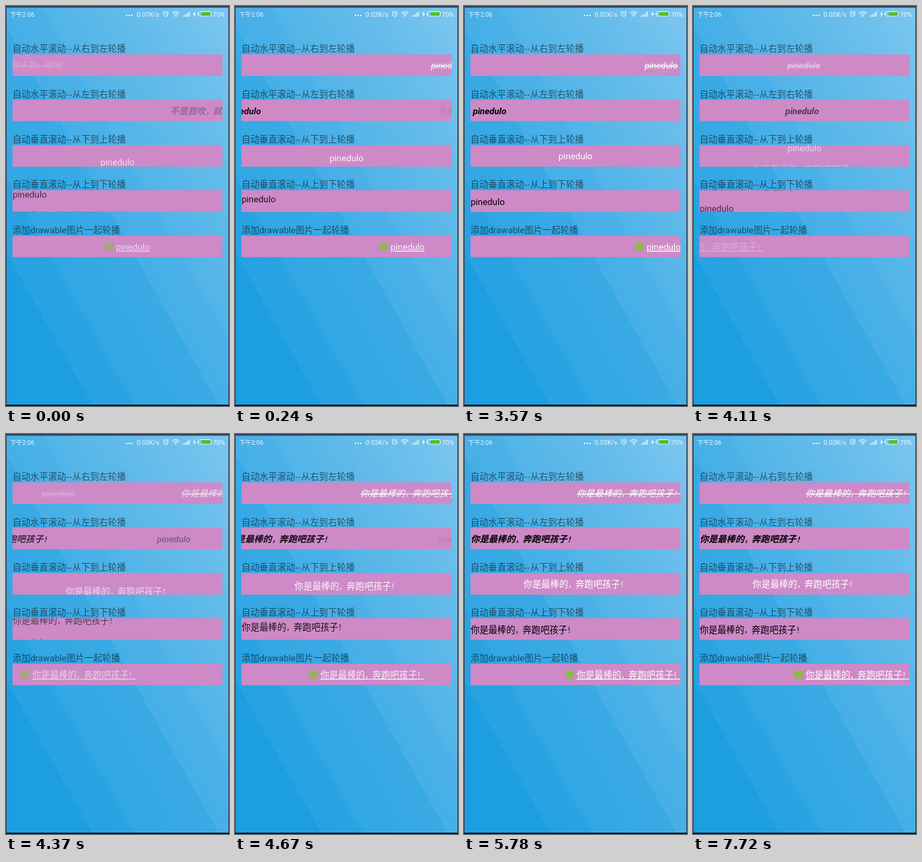
An HTML page for the animation above (8000 ms loop, 333 px wide and 595 px high).

```html
<!DOCTYPE html>
<html lang="zh">
<head>
<meta charset="utf-8">
<style>
html, body { margin: 0; width: 100%; height: 100%; overflow: hidden; background: #0d141c; }
svg { display: block; }
svg svg { overflow: hidden; }
text { font: 13.33px Roboto, "Noto Sans CJK SC", "Noto Sans CJK", sans-serif; white-space: pre; }
.status text { font-size: 9.7px; fill: #fff; }
.status .clock { font-size: 9.3px; }
.label { fill: #000; fill-opacity: .54; }
.dashed { font-family: "Noto Sans CJK SC", "Noto Sans CJK", sans-serif; }
.mark { font-family: "Noto Sans CJK JP", "Noto Sans CJK", sans-serif; font-size: 11px; }
.light { fill: #fff; }
.strike { font-style: italic; text-decoration: line-through; }
.bold { font-style: italic; font-weight: bold; }
.under { text-decoration: underline; }
</style>
</head>
<body>
<svg id="stage" width="333" height="595" viewBox="0 0 333 595">
  <defs>
    <linearGradient id="sky" gradientUnits="userSpaceOnUse" x1="-252" y1="142" x2="252" y2="-142">
      <stop offset=".19" stop-color="#1c9ee0"/>
      <stop offset=".19" stop-color="#27a2e2"/>
      <stop offset=".285" stop-color="#29a3e2"/>
      <stop offset=".285" stop-color="#32a7e3"/>
      <stop offset=".475" stop-color="#3aaae5"/>
      <stop offset=".475" stop-color="#46afe7"/>
      <stop offset=".58" stop-color="#4bb1e8"/>
      <stop offset=".58" stop-color="#51b4e8"/>
      <stop offset=".76" stop-color="#62bbea"/>
      <stop offset="1" stop-color="#7cc6f0"/>
    </linearGradient>
  </defs>
  <rect width="333" height="593" fill="#33435a"/>
  <rect x="1" y="2.5" width="331" height="590.5" fill="url(#sky)"/>
  <g class="status" fill="none" stroke="#fff" opacity=".9">
    <g stroke="none">
      <text class="clock" x="6" y="15.5">下午2:06</text>
      <text id="speed" x="195" y="15.5"></text>
      <text x="309" y="15.5">70%</text>
    </g>
    <path d="M179 14h2m2 0h2m2 0h2" stroke-width="2"/>
    <circle cx="238.5" cy="12" r="3.5"/>
    <path d="M238.5 10v2.3h2M234.3 9l2-1.6M242.7 9l-2-1.6"/>
    <path d="M248 10.5q5.5-4.5 11 0M250 12.5q3.5-2.8 7 0" stroke-width="1.2"/>
    <circle cx="253.5" cy="14.5" r="1.2" fill="#fff" stroke="none"/>
    <path d="M265 16v-2m2.2 2v-3m2.2 3v-4.5m2.2 4.5v-6m2.2 6v-8" stroke-width="1.2"/>
    <path d="M282.5 7.5l-3.5 5h2.300l-1 4 3.700-5h-2.400z" fill="#fff" stroke="none"/>
    <rect x="287.5" y="8.5" width="19" height="6.500" rx="2"/>
    <path d="M286.5 10.5v2.5"/>
    <rect x="292" y="9" width="13.5" height="5.500" rx="1" fill="#4fc110" stroke="none"/>
  </g>
</svg>
<script>
const LOOP = 8000, SLIDE = 1436, WIDTH = 314, HEIGHT = 32.4;
const messages = ['不是我吹，就没做不到，哈哈', 'pinedulo', '你是最棒的，奔跑吧孩子！'];
const slideStarts = [-971, 3461];
// The screen only refreshes at these moments.
const refreshes = [0, 120, 240, 390, 520, 670, 3570, 3690, 3840, 3960, 4110,
  4250, 4370, 4520, 4670, 4820, 4950, 5100];
const speeds = [[0, '0.07K/s'], [120, '0.02K/s'], [4250, '0.03K/s']];

const rows = [
  { label: '自动水平滚动--从右到左轮播', style: 'light strike', anchor: 'end', dx: -1, dy: 0, delay: 0 },
  { label: '自动水平滚动--从左到右轮播', style: 'bold', anchor: 'start', dx: 1, dy: 0, delay: 16 },
  { label: '自动垂直滚动--从下到上轮播', style: 'light', anchor: 'middle', dx: 0, dy: -1, delay: 45 },
  { label: '自动垂直滚动--从上到下轮播', style: '', anchor: 'start', dx: 0, dy: 1, delay: 105 },
  { label: '添加drawable图片一起轮播', style: 'light under', anchor: 'end', dx: 1, dy: 0, delay: 110, icon: true }
];
const anchorX = { start: 0.4, middle: WIDTH / 2, end: WIDTH };

function add(parent, tag, attrs, content = '') {
  const node = document.createElementNS('http://www.w3.org/2000/svg', tag);
  for (const key in attrs) node.setAttribute(key, attrs[key]);
  node.textContent = content;
  return parent.appendChild(node);
}

const stage = document.getElementById('stage');
const speed = document.getElementById('speed');

function makeMessage(box, row, content) {
  const group = add(box, 'g', {});
  const text = add(group, 'text', {
    x: anchorX[row.anchor], y: 21.6, 'text-anchor': row.anchor, class: row.style
  });
  // Punctuation is set a little smaller than the characters.
  for (const part of content.split(/([，！])/).filter(Boolean)) {
    add(text, 'tspan', /[，！]/.test(part) ? { class: 'mark' } : {}, part);
  }
  if (row.icon) {
    const x = WIDTH - text.getComputedTextLength() - 17;
    add(group, 'rect', { x, y: 10.5, width: 13, height: 11.5, fill: '#8bbb4c' });
  }
  return group;
}

rows.forEach((row, i) => {
  const top = 71.8 + i * 67.4;
  const dashed = row.label.includes('--') ? ' dashed' : '';
  add(stage, 'text', { x: 9.7, y: top - 3.6, class: 'label' + dashed }, row.label);
  const box = add(stage, 'svg', { x: 9.5, y: top, width: WIDTH, height: HEIGHT });
  add(box, 'rect', { width: WIDTH, height: HEIGHT, fill: '#cd8ac7' });
  row.groups = messages.map(content => makeMessage(box, row, content));
});

function place(group, row, shift, alpha) {
  group.setAttribute('transform', `translate(${row.dx * shift * WIDTH} ${row.dy * shift * HEIGHT})`);
  group.setAttribute('opacity', alpha);
}

function draw(time) {
  const now = refreshes.findLast(t => t <= time);
  const slide = slideStarts.findLastIndex(t => t <= now);
  speed.textContent = speeds.findLast(([t]) => t <= now)[1];
  for (const row of rows) {
    const p = Math.min(1, Math.max(0, (now - slideStarts[slide] - row.delay) / SLIDE));
    const eased = (1 - Math.cos(Math.PI * p)) / 2;
    row.groups.forEach((group, index) => {
      if (index === slide) place(group, row, eased, 1 - eased);
      else if (index === slide + 1) place(group, row, eased - 1, eased);
      else place(group, row, 1, 0);
    });
  }
}

const begin = performance.now();
function tick() {
  draw((performance.now() - begin) % LOOP);
  requestAnimationFrame(tick);
}
tick();
</script>
</body>
</html>
```
